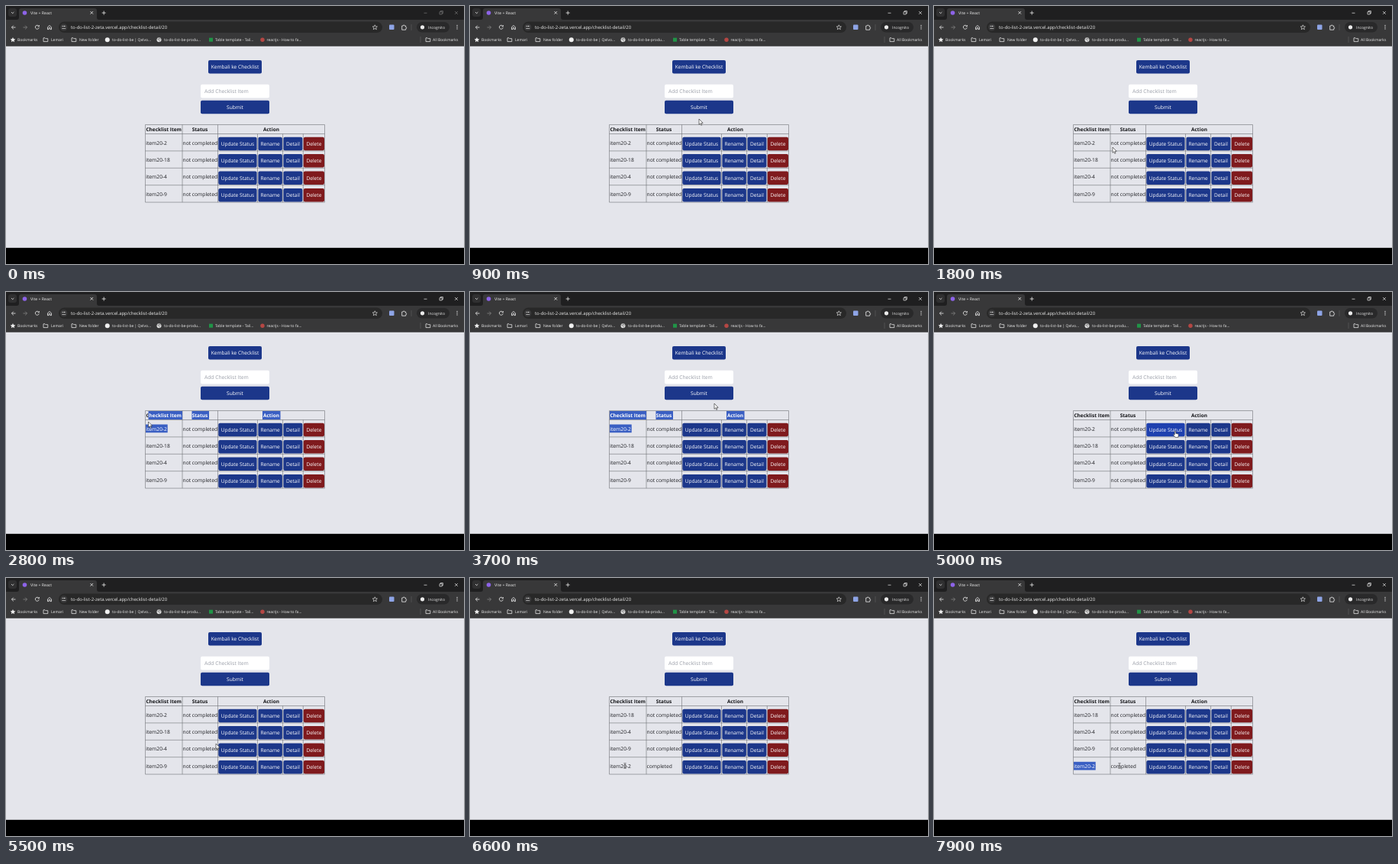
Recreate the animation shown at these times as an HTML page. Size 600 by 338 pixels, loop 8 s.

```html
<!DOCTYPE html>
<html lang="en">
<head>
<meta charset="utf-8">
<title>Checklist detail</title>
<style>
  html, body { margin: 0; width: 100%; height: 100%; overflow: hidden; background: #000; }
  svg { display: block; width: 100%; height: 100%; }
  text { font-family: "Open Sans", "Noto Sans", sans-serif; white-space: pre; text-rendering: geometricPrecision; }
</style>
</head>
<body>
<svg id="stage" viewBox="0 0 600 338">
  <defs><clipPath id="selected"><path id="clipShape"/></clipPath></defs>
  <g id="browser"></g>
  <g id="page"></g>
  <path id="highlight" fill="#3a5fc3"/>
  <g id="inverse" clip-path="url(#selected)"></g>
  <g id="cursor"></g>
</svg>
<script>
const LOOP = 8000, STEP = 100;
const BLUE = '#1c378a', BLUE_HOVER = '#1e40af', RED = '#7f1a1d', RED_HOVER = '#991b1b';
const BAR = '#383839', LIGHT = '#ececec', DIM = '#777', INK = '#1d1e22', LINE = '#66676c';
const PAGE_TOP = 52.7, PAGE_BOTTOM = 316.9, ROW_TOP = 167.5, ROW_HEIGHT = 22.4;
const byId = id => document.getElementById(id);

function add(parent, tag, attrs, content) {
  const node = document.createElementNS('http://www.w3.org/2000/svg', tag);
  for (const key in attrs) node.setAttribute(key, attrs[key]);
  if (content !== undefined) node.textContent = content;
  parent.append(node);
  return node;
}
const rect = (parent, x, y, width, height, fill, rx = 0) =>
  add(parent, 'rect', { x, y, width, height, fill, rx });
const circle = (parent, cx, cy, r, fill) => add(parent, 'circle', { cx, cy, r, fill });
const stroke = (parent, d, color = LIGHT, width = 0.8) =>
  add(parent, 'path', { d, fill: 'none', stroke: color, 'stroke-width': width, 'stroke-linejoin': 'round' });
const label = (parent, x, y, text, size, fill, more = {}) =>
  add(parent, 'text', { x, y, 'font-size': size, fill, ...more }, text);
const centered = { 'text-anchor': 'middle' };

let windowControls;
function drawBrowser(g) {
  rect(g, 0, 0, 600, PAGE_TOP, BAR);
  rect(g, 0, 0, 600, 18, '#1f1f20');
  rect(g, 3, 3, 11, 11, '#303031', 3);
  stroke(g, 'M7 8l1.7 1.7l1.7 -1.7');
  add(g, 'path', { d: 'M14 18q3 0 3 -3v-9q0 -3 3 -3h96q3 0 3 3v9q0 3 3 3z', fill: BAR });
  circle(g, 24.5, 9, 2.8, '#8d63e8');
  label(g, 32, 11, 'Vite + React', 5.2, LIGHT);
  stroke(g, 'M110.5 7l3.6 3.6m0 -3.6l-3.6 3.6M125.7 9h5m-2.5 -2.5v5');
  windowControls = stroke(g, 'M547.5 9.2h4M568 7.7h3.2v3.2h-3.2zM569.2 7.7v-1.2h3.2v3.2h-1.2M588 7l3.8 3.8m0 -3.8l-3.8 3.8', LIGHT, 0.7);

  // navigation
  stroke(g, 'M12.5 28h-5m2.3 -2.4l-2.4 2.4l2.4 2.4');
  stroke(g, 'M22.5 28h5m-2.3 -2.4l2.4 2.4l-2.4 2.4', '#858585');
  stroke(g, 'M43 26.4a2.5 2.5 0 1 0 .3 2M43.4 25v1.8h-1.8M54.5 27.7l2.5 -2.2l2.5 2.2v2.9h-1.6v-2h-1.8v2h-1.6z');
  rect(g, 69, 20.5, 424, 14.6, '#282828', 7.3);
  circle(g, 75.7, 27.8, 4.8, BAR);
  stroke(g, 'M73.4 26.4h2m2 0h.8M73.4 29.4h.8m2 0h2', LIGHT, 0.7);
  circle(g, 76.4, 26.4, 0.7, LIGHT);
  circle(g, 75, 29.4, 0.7, LIGHT);
  label(g, 85, 30, 'to-do-list-2-zeta.vercel.app/checklist-detail/20', 5.97, LIGHT);
  stroke(g, 'M483.3 24.8l.9 2l2.2 .2l-1.7 1.5l.6 2.2l-2 -1.2l-2 1.2l.6 -2.2l-1.7 -1.5l2.2 -.2z', LIGHT, 0.65);
  rect(g, 502, 24.5, 6.5, 6.5, '#8ea4e6', 1);
  stroke(g, 'M518.7 26h1.5a1 1 0 0 1 2 0h1.5v1.7a1 1 0 0 1 0 2v1.5h-5z');
  stroke(g, 'M531 24v8', '#626262', 0.6);
  rect(g, 538, 21, 43, 13.5, '#29292a', 6.7);
  circle(g, 545.5, 27.8, 2.6, LIGHT);
  label(g, 553, 29.7, 'Incognito', 5.05, LIGHT);
  for (const y of [25.5, 27.7, 29.9]) circle(g, 591, y, 0.65, LIGHT);

  // bookmarks
  const bookmark = (x, text) => label(g, x, 46, text, 5, LIGHT);
  const folder = x => stroke(g, `M${x} 41.8h2l.8 .9h3v3.9h-5.8z`, LIGHT, 0.75);
  add(g, 'path', { d: 'M9 41l1 2.1l2.3 .3l-1.7 1.5l.5 2.3l-2.1 -1.2l-2.1 1.2l.5 -2.3l-1.7 -1.5l2.3 -.3z', fill: LIGHT });
  bookmark(15, 'Bookmarks');
  folder(49);
  bookmark(59, 'Lemari');
  folder(86);
  bookmark(96, 'New folder');
  circle(g, 132.8, 44.2, 3, '#f0f0f0');
  bookmark(139, 'to-do-list-be | Qelvo...');
  circle(g, 200.5, 44.2, 3, '#dcdcdc');
  stroke(g, 'M198.3 43q2 .2 2.2 2l1.5 1.4M200.3 41.5l.4 1.5h2.2', '#555', 0.7);
  bookmark(207, 'to-do-list-be-produ...');
  rect(g, 266, 41.7, 5, 5, '#209447');
  bookmark(274, 'Table template - Tail...');
  circle(g, 336, 44.2, 2.7, '#b54744');
  bookmark(341.5, 'reactjs - How to fa...');
  stroke(g, 'M543 40v8', '#626262', 0.6);
  folder(550);
  bookmark(559, 'All Bookmarks');
}

const buttons = [];
function button(g, x, y, width, text, danger) {
  const fills = danger ? [RED, RED_HOVER] : [BLUE, BLUE_HOVER];
  const box = rect(g, x, y, width, 17.5, fills[0], 2);
  label(g, x + width / 2, y + 11.3, text, 6.6, '#fff', { ...centered, 'font-weight': 500 });
  buttons.push({ x, y, width, box, fills });
}

const headers = [
  { x: 206.7, text: 'Checklist Item', from: 183, to: 231 },
  { x: 254, text: 'Status', from: 243.5, to: 266 },
  { x: 347.5, text: 'Action', from: 336, to: 359.5 }
];
const actions = [[278.3, 50.3, 'Update Status'], [330.4, 31.5, 'Rename'], [363.4, 25, 'Detail'], [389.8, 27.2, 'Delete', true]];
const rows = [];

function drawPage(g, inverse) {
  rect(g, 0, PAGE_TOP, 600, PAGE_BOTTOM - PAGE_TOP, '#e4e5eb');
  rect(g, 0, PAGE_BOTTOM, 600, 338 - PAGE_BOTTOM, '#000');
  button(g, 265, 71, 70, 'Kembali ke Checklist');
  rect(g, 255, 102.7, 90, 17.8, '#fff', 2);
  label(g, 260, 114, 'Add Checklist Item', 6.7, '#9a9ea8');
  button(g, 255, 123.8, 90, 'Submit');

  for (const head of headers) {
    for (const [layer, fill] of [[g, '#141518'], [inverse, '#fff']])
      label(layer, head.x, 164, head.text, 6.5, fill, { ...centered, 'font-weight': 700 });
  }
  let grid = 'M182.5 155.5H417.5V257.1H182.5zM231 155.5V257.1M277.5 155.5V257.1';
  for (let i = 0; i < 4; i++) grid += `M182.5 ${ROW_TOP + i * ROW_HEIGHT}H417.5`;
  for (const x of [329.5, 362.6, 389.3]) grid += `M${x} ${ROW_TOP}V257.1`;
  stroke(g, grid, LINE, 0.55);

  for (let i = 0; i < 4; i++) {
    const top = ROW_TOP + i * ROW_HEIGHT, base = top + 14;
    rows.push({
      base,
      item: label(g, 183.3, base, '', 6.7, INK),
      status: label(g, 231.6, base, '', 6.7, INK),
      inverse: label(inverse, 183.3, base, '', 6.7, '#fff')
    });
    for (const [x, width, text, danger] of actions) button(g, x, top + 4.2, width, text, danger);
  }
}

// Pointer path: time, x, y
const path = [
  [100, 392, 146], [200, 380, 135], [500, 380, 135], [900, 300, 148], [1300, 236, 178], [1800, 234, 185],
  [2200, 218, 181], [2400, 212, 179], [2700, 183, 178], [2900, 190, 162], [3100, 240, 157], [3700, 320, 146],
  [4050, 325, 129], [4200, 322, 160], [4400, 316, 182], [5000, 316, 182], [5500, 275, 217], [6000, 230, 236],
  [6600, 203, 246], [6900, 212, 246], [7300, 183, 246], [7900, 243, 246]
];
const FOCUSED_AT = 500, MOVED_AT = 6000, DRAG = [2400, 4150], SECOND_DRAG = [6900, 7300];

function pointerAt(t) {
  if (t < path[0][0]) return null;
  const next = path.findIndex(point => point[0] > t);
  if (next < 0) return path.at(-1).slice(1);
  const [t0, x0, y0] = path[next - 1], [t1, x1, y1] = path[next];
  const k = (t - t0) / (t1 - t0);
  return [x0 + (x1 - x0) * k, y0 + (y1 - y0) * k];
}

const band = (from, to, y, height) => to > from ? `M${from} ${y}H${to}v${height}H${from}z` : '';

function selectionAt(t, pointer) {
  if (t >= DRAG[0] && t < DRAG[1]) {
    const [x, y] = pointer;
    const aboveItem = y < 172;
    let d = band(aboveItem ? 183 : Math.max(183, x), 211.7, 173.5, 10.8);
    if (aboveItem)
      for (const h of headers) d += band(y < 158 ? h.from : Math.max(h.from, x), h.to, 156, 11);
    return d;
  }
  if (t >= SECOND_DRAG[0]) return band(t < SECOND_DRAG[1] ? Math.max(183, pointer[0]) : 183, 211.7, 240.8, 10.8);
  return '';
}

const shapes = {};
function drawCursors(g) {
  const solid = { fill: '#fff', stroke: '#222', 'stroke-width': 0.6, 'stroke-linejoin': 'round' };
  shapes.arrow = add(g, 'path', { ...solid, d: 'M0 0v7.3l1.7 -1.5l1.1 2.5l1.2 -.6l-1.1 -2.4h2.3z' });
  shapes.hand = add(g, 'path', { ...solid, d: 'M-.8 .7q.8 -1.2 1.6 0v2.6l2.9 .7q.8 .3 .7 1.2l-.5 3.2h-3.8l-2.6 -3.2q.4 -1.2 1.7 -.1z' });
  shapes.beam = stroke(g, 'M-1.5 -3.4h1l.5 .5l.5 -.5h1M0 -2.9v5.8M-1.5 3.4h1l.5 -.5l.5 .5h1', '#333', 0.65);
}

function render(t) {
  const pointer = pointerAt(t);
  const [px, py] = pointer || [-99, -99];
  const dragging = t >= DRAG[0] && t < DRAG[1];
  windowControls.setAttribute('stroke', t < FOCUSED_AT ? DIM : LIGHT);

  let kind = 'arrow';
  for (const b of buttons) {
    const hit = !dragging && px > b.x && px < b.x + b.width && py > b.y && py < b.y + 17.5;
    b.box.setAttribute('fill', b.fills[+hit]);
    if (hit) kind = 'hand';
  }

  const moved = t >= MOVED_AT;
  const ids = moved ? [18, 4, 9, 2] : [2, 18, 4, 9];
  rows.forEach((row, i) => {
    row.item.textContent = row.inverse.textContent = 'item20-' + ids[i];
    row.status.textContent = moved && i === 3 ? 'completed' : 'not completed';
    const overText = (px > 183 && px < 215) || (px > 231.5 && px < 277);
    if (overText && py > row.base - 6.5 && py < row.base + 2.2) kind = 'beam';
  });
  if (Math.abs(px - 275) < 2 && py < 220) kind = 'arrow';

  const selection = selectionAt(t, pointer);
  byId('highlight').setAttribute('d', selection);
  byId('clipShape').setAttribute('d', selection);

  byId('cursor').setAttribute('transform', `translate(${px} ${py})`);
  for (const name in shapes) shapes[name].setAttribute('visibility', name === kind ? 'visible' : 'hidden');
}

drawBrowser(byId('browser'));
drawPage(byId('page'), byId('inverse'));
drawCursors(byId('cursor'));

const start = performance.now();
function tick() {
  const t = (performance.now() - start) % LOOP;
  render(Math.floor(t / STEP) * STEP);
  requestAnimationFrame(tick);
}
tick();
</script>
</body>
</html>
```
